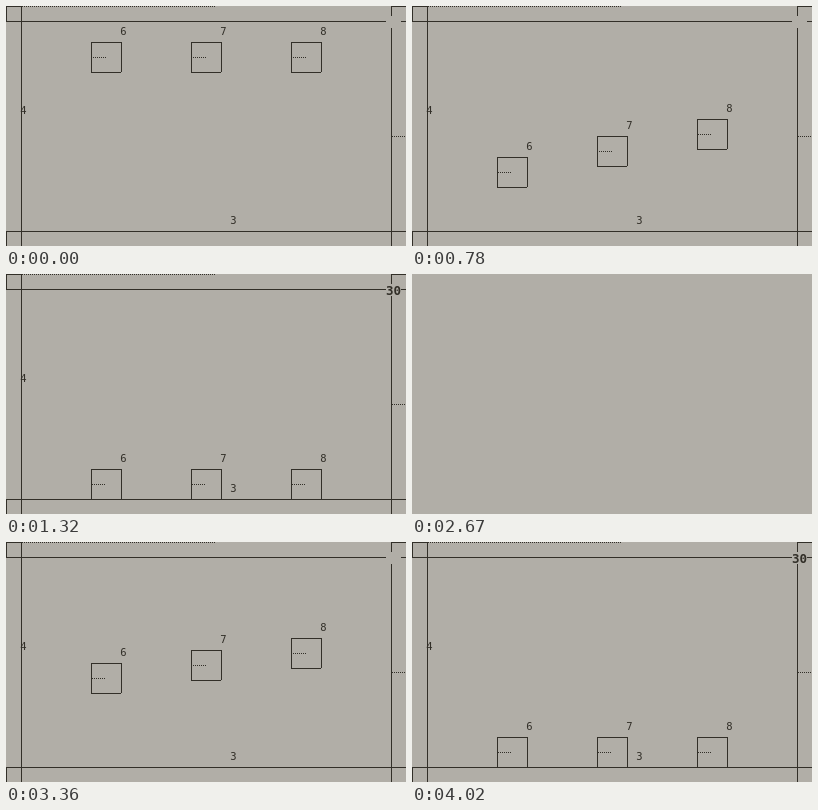
Write an HTML page that moves like this. It is 400 by 240 pixels and loops after 4590 ms.

```html
<!DOCTYPE html>
<html lang="en">
<head>
<meta charset="utf-8">
<title>Falling boxes</title>
<style>
  html, body { margin: 0; width: 100%; height: 100%; overflow: hidden; background: #b1aea7; }
  svg { display: block; width: 400px; height: 240px; }
  path { fill: none; stroke: #322f28; shape-rendering: crispEdges; }
  .dots { stroke-dasharray: 1 1; }
  text { fill: #322f28; font: 10.5px "DejaVu Sans Mono", monospace; text-anchor: middle; }
  #fps { font-size: 12.5px; font-weight: bold; }
</style>
</head>
<body>
<svg viewBox="0 0 400 240">
  <g id="scene">
    <path d="M0 15.5H380M395 15.5H400M0 225.5H400M15.5 0V240M385.5 0V10M385.5 22V240"/>
    <path d="M.5 0V15M.5 225V240M0 .5H15M385 .5H400"/>
    <path class="dots" d="M16 .5H210M386 130.5H400"/>
    <text x="17.5" y="108">4</text>
    <text x="227.5" y="218">3</text>
    <g id="boxes"></g>
    <text id="fps" x="387.6" y="20.6">30</text>
  </g>
</svg>
<script>
const LOOP = 4590, RESET = 2670, TICK = 30;
const TOP = 36, FLOOR = 195, GRAVITY = 0.2885;
const byId = id => document.getElementById(id);
const scene = byId('scene'), fps = byId('fps');

function add(parent, tag, attrs) {
  const el = document.createElementNS('http://www.w3.org/2000/svg', tag);
  for (const key in attrs) el.setAttribute(key, attrs[key]);
  return parent.appendChild(el);
}

// Same gravity, increasing air drag
const boxes = [0.0018, 0.026, 0.051].map((drag, i) => {
  const x = 85 + 100 * i;
  const group = add(byId('boxes'), 'g', {});
  add(group, 'path', { d: `M${x} .5h31M${x + 0.5} 0v31M${x} 30.5h30M${x + 30.5} 0v30` });
  const dots = add(group, 'path', { class: 'dots' });
  add(group, 'text', { x: x + 32.5, y: -7 }).textContent = 6 + i;
  return { x, drag, group, dots };
});

function fallen(steps, drag) {
  let v = 0, d = 0;
  for (let i = 0; i < steps; i++) {
    v = v * (1 - drag) + GRAVITY;
    d += v;
  }
  return d;
}

function draw(ms) {
  const t = ms % LOOP;
  const blank = t >= RESET && t < RESET + TICK;
  scene.style.display = blank ? 'none' : '';
  if (blank) return;

  const run = t < RESET ? t : t - RESET - TICK;
  const tick = Math.floor(run / TICK);
  const even = tick - tick % 2;
  const steps = even ? even + 2 : 0;
  fps.style.display = tick >= 29 ? '' : 'none';

  for (const { x, drag, group, dots } of boxes) {
    const y = Math.min(FLOOR, Math.round(TOP + fallen(steps, drag)));
    group.setAttribute('transform', `translate(0 ${y})`);
    // The dot pattern is fixed to the screen, so it shifts with the row
    dots.setAttribute('d', `M${x + 1 + (y + 15) % 2} 15.5H${x + 15}`);
  }
}

const start = performance.now();
function frame() {
  draw(performance.now() - start);
  requestAnimationFrame(frame);
}
frame();
</script>
</body>
</html>
```
